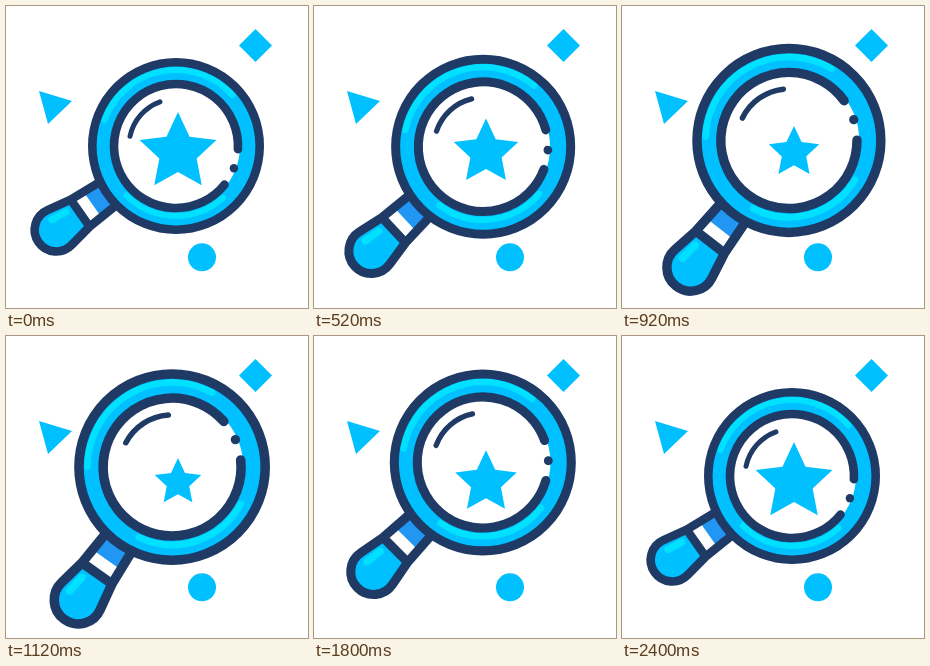
An HTML page that plays this animation: 302x302 px, repeating every 2440 ms.

```html
<!DOCTYPE html>
<html lang="en">
<head>
<meta charset="utf-8">
<title>Magnifier</title>
<style>
  html, body { margin: 0; width: 100%; height: 100%; overflow: hidden; background: #fff; }
  svg { display: block; width: 100vw; height: 100vh; }
  .sky { fill: #00c0ff; }
  .line { fill: none; stroke: #1f3a64; stroke-width: 8.6; stroke-linecap: round; stroke-linejoin: round; }
  .glow { fill: none; stroke: #00e1ff; stroke-linecap: round; }
</style>
</head>
<body>
<svg viewBox="0 0 302 302">
  <path class="sky" d="M249.5 23 266 39.5 249.5 56 233 39.5ZM33 85 66 95 42 118Z"/>
  <circle class="sky" cx="196" cy="251.3" r="14"/>

  <g id="glass">
    <g id="handle">
      <path fill="#2196f3" d="M78-14H104V14H78Z"/>
      <path fill="#fff" d="M102-15H117V15H102Z"/>
      <path class="sky" d="M117-16.5 142-21.2A21.6 21.6 0 1 1 142 21.2L117 16.5Z"/>
      <path class="glow" stroke-width="7" d="M128 9 144 11"/>
      <path class="line" d="M80-14 117-16.5 142-21.2A21.6 21.6 0 1 1 142 21.2L117 16.5 80 14M117-16.5V16.5"/>
    </g>
    <circle class="sky" r="84"/>
    <g id="shine">
      <path class="glow" id="shineTop" stroke-width="6"/>
      <path class="glow" id="shineLow" stroke-width="6"/>
    </g>
    <circle fill="#fff" r="64"/>
    <circle class="line" r="83.7"/>
    <g id="rim">
      <path class="line" id="rimArc"/>
      <circle id="bead" r="4.2" fill="#1f3a64"/>
    </g>
    <path class="line" id="glare" style="stroke-width:5"/>
  </g>

  <path class="sky" id="star"/>
</svg>
<script>
  const LOOP = 2440, SPAN = 2400, STEP = 40;
  const el = id => document.getElementById(id);
  const polar = (r, deg) => {
    const a = deg * Math.PI / 180;
    return [r * Math.cos(a), r * Math.sin(a)];
  };
  const arc = (r, from, to) =>
    `M${polar(r, from)}A${r} ${r} 0 ${to - from > 180 ? 1 : 0} 1 ${polar(r, to)}`;
  const set = (id, name, value) => el(id).setAttribute(name, value);
  const turn = (id, deg) => set(id, 'transform', `rotate(${deg})`);

  set('rimArc', 'd', arc(62, 38.5, 363));
  set('glare', 'd', arc(47, 192, 250));
  set('shineTop', 'd', arc(76, 200, 318));
  set('shineLow', 'd', arc(70, 48, 135));
  const [bx, by] = polar(62, 21);
  set('bead', 'cx', bx);
  set('bead', 'cy', by);

  const points = Array.from({ length: 10 }, (_, i) => polar(i % 2 ? 19.6 : 40.4, i * 36 - 90));
  set('star', 'd', 'M' + points.join('L') + 'Z');

  function draw(now) {
    const t = Math.floor((now % LOOP) / STEP) * STEP;
    const p = t / SPAN;
    const k = 1 - Math.abs(2 * p - 1);
    const u = k * k * (3 - 2 * k);   // eased out and back
    const a = p * 2 * Math.PI;

    // the lens drifts round a small uneven loop
    const x = 170 - 4 * u + 0.8 * Math.sin(a) ** 2;
    const y = 133.94 + 5.14 * Math.cos(a) + 6.6 * Math.sin(a)
            + 0.92 * Math.cos(2 * a) + 0.15 * Math.sin(2 * a);
    set('glass', 'transform', `translate(${x} ${y}) scale(${1 + 0.114 * u})`);
    turn('handle', 145 - 20 * u);
    turn('shine', -20 * u);
    turn('rim', -45 * u);
    turn('glare', 16 * u);
    set('star', 'transform', `translate(172 146.5) scale(${1 - 0.4 * u})`);
    requestAnimationFrame(draw);
  }
  draw(performance.now());
</script>
</body>
</html>
```
